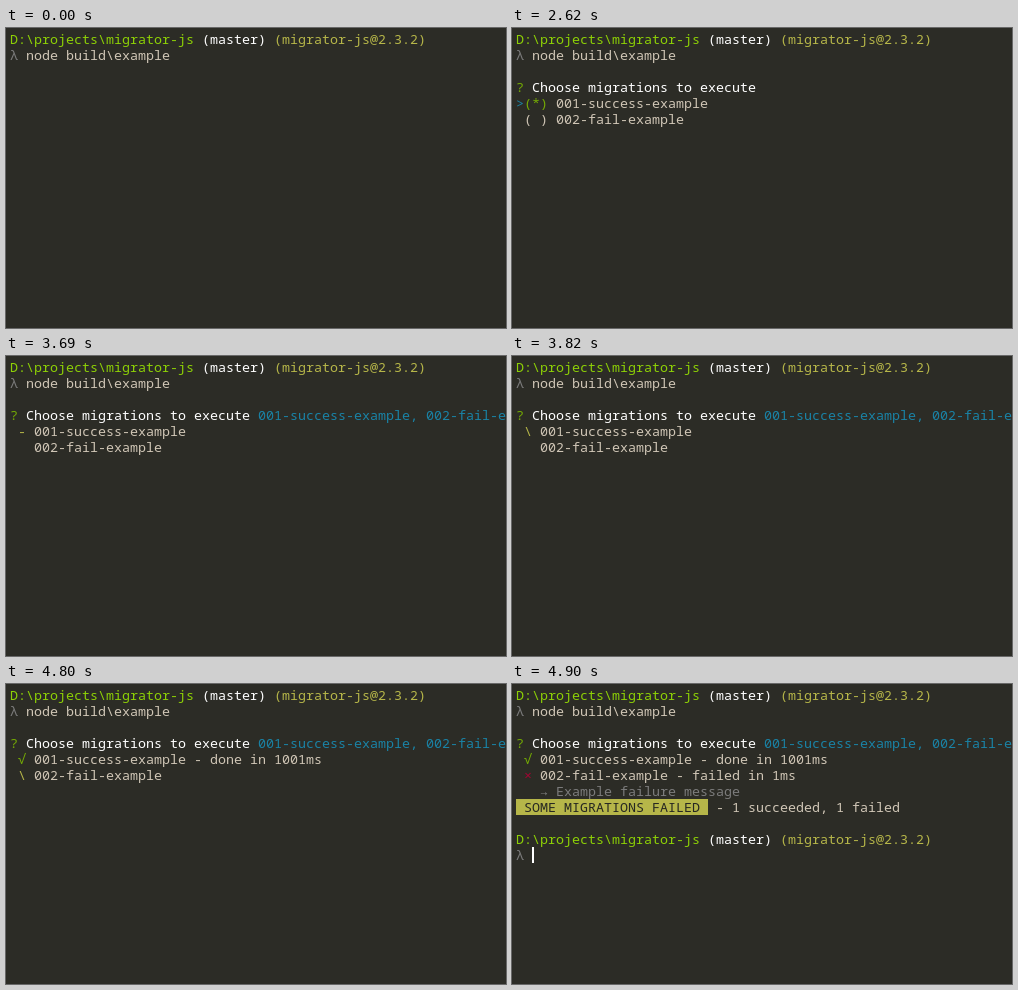
These frames come from a looping animation (500 by 300 pixels, 7900 ms). An HTML page:

```html
<!DOCTYPE html>
<html lang="en">
<head>
<meta charset="utf-8">
<title>Terminal: choosing and running migrations</title>
<style>
  html, body { margin: 0; width: 100%; height: 100%; overflow: hidden; background: #2c2c26; }
  svg { display: block; }
  text { font: 13.333px "Noto Sans Mono", "DejaVu Sans Mono", monospace; white-space: pre; }
</style>
</head>
<body>
<svg id="screen" width="500" height="300" viewBox="0 0 500 300"></svg>
<script>
const LOOP = 7900, LEFT = 4, TOP = 3, CELL = 8, LINE = 16;
const C = {
  bg: '#272822', text: '#d0c6b6', white: '#ffffff', gray: '#7c7c7c',
  lime: '#8dd006', green: '#74aa04', yellow: '#b6b649', red: '#a70334',
  teal: '#1a83a6', cyan: '#58c2e5'
};
const TASKS = ['001-success-example', '002-fail-example'];
const SPIN = '-\\|/';
const screen = document.getElementById('screen');

function add(name, attrs, content = '') {
  const el = document.createElementNS('http://www.w3.org/2000/svg', name);
  for (const key in attrs) el.setAttribute(key, attrs[key]);
  el.textContent = content;
  screen.append(el);
}

// Writes alternating colour / string pairs on the character grid.
function write(row, col, ...runs) {
  for (let i = 0; i < runs.length; i += 2) {
    add('text', { x: LEFT + col * CELL, y: TOP + row * LINE + 13, fill: runs[i] }, runs[i + 1]);
    col += runs[i + 1].length;
  }
}

function block(row, col, width, fill) {
  add('rect', { x: LEFT + col * CELL, y: TOP + row * LINE, width, height: LINE, fill });
}

function prompt(row) {
  write(row, 0, C.lime, 'D:\\projects\\migrator-js', C.white, ' (master)', C.yellow, ' (migrator-js@2.3.2)');
  write(row + 1, 0, C.gray, 'λ');
}

function question() {
  write(3, 0, C.green, '?', C.white, ' Choose migrations to execute');
}

function choose(pointer, checked, hint) {
  question();
  if (hint) {
    write(3, 31, C.text, '(Press ', C.cyan, '<space>', C.text, ' to select, ',
      C.cyan, '<a>', C.text, ' to toggle all)');
  }
  TASKS.forEach((task, i) => {
    const on = i < checked;
    write(4 + i, 1, on ? C.green : C.text, on ? '(*)' : '( )', C.text, ' ' + task);
  });
  write(4 + pointer, 0, C.teal, '>');
}

function run(first, second, firstNote = '', secondNote = '') {
  question();
  write(3, 31, C.teal, TASKS.join(', '));
  write(4, 1, ...first, C.text, ' ' + TASKS[0] + firstNote);
  write(5, 1, ...second, C.text, ' ' + TASKS[1] + secondNote);
}

const spinner = n => [C.yellow, SPIN[n % 4]];
const idle = [C.text, ' '], tick = [C.green, '√'], cross = [C.red, '×'];
const doneNote = ' - done in 1001ms';

function summary() {
  run(tick, cross, doneNote, ' - failed in 1ms');
  write(6, 3, C.gray, '→ Example failure message');
  block(7, 0, 24 * CELL, C.yellow);
  write(7, 1, C.bg, 'SOME MIGRATIONS FAILED');
  write(7, 25, C.text, '- 1 succeeded, 1 failed');
}

function finish() {
  summary();
  prompt(9);
  block(10, 2, 2, C.white);
}

const spinTimes = [3690, 3820, 3920, 4030, 4130, 4230, 4340, 4440, 4520, 4620];
const steps = [
  [0, () => {}],
  [1460, () => choose(0, 0, true)],
  [2620, () => choose(0, 1)],
  [2950, () => choose(1, 1)],
  [3310, () => choose(1, 2)],
  ...spinTimes.map((t, n) => [t, () => run(spinner(n), idle)]),
  [4720, () => run(tick, spinner(0), doneNote)],
  [4800, () => run(tick, spinner(1), doneNote)],
  [4850, summary],
  [4900, finish]
];

let shown = -1;
function frame() {
  const t = performance.now() % LOOP;
  const index = steps.findLastIndex(step => step[0] <= t);
  if (index !== shown) {
    shown = index;
    screen.replaceChildren();
    prompt(0);
    write(1, 2, C.text, 'node build\\example');
    steps[index][1]();
  }
  requestAnimationFrame(frame);
}
frame();
</script>
</body>
</html>
```
